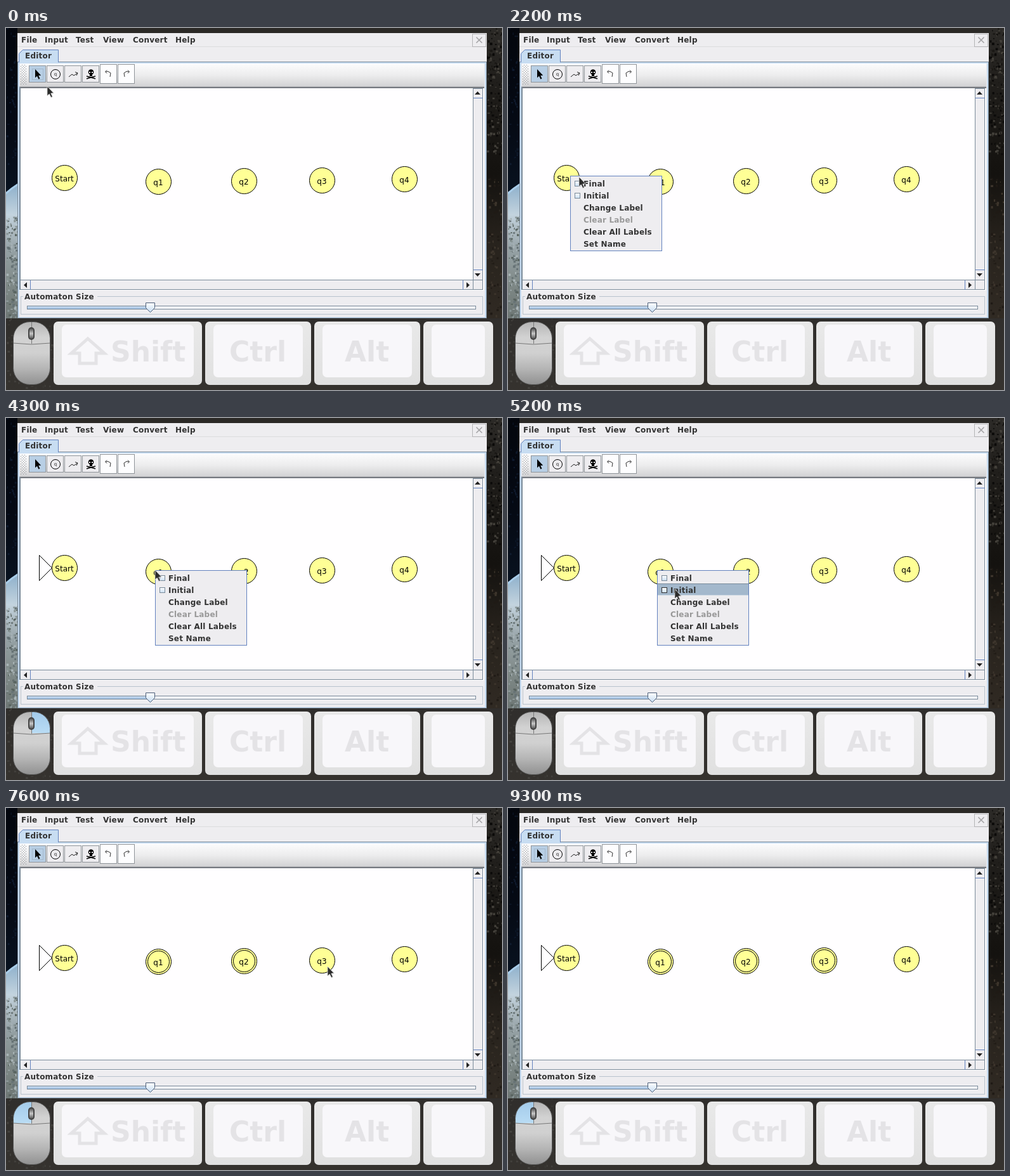
Animation, 782 px wide and 571 px high, one loop 9400 ms. Source, as an HTML page with a canvas:

```html
<!DOCTYPE html>
<html lang="en">
<head>
<meta charset="utf-8">
<title>Automaton editor</title>
<style>
html, body { margin: 0; width: 100%; height: 100%; overflow: hidden; background: #2b2926; }
canvas { display: block; }
</style>
</head>
<body>
<canvas id="stage" width="782" height="571"></canvas>
<script>
const W = 782, H = 571, LOOP = 9400;
const stage = document.getElementById('stage').getContext('2d');
const backdrop = document.createElement('canvas');
backdrop.width = W;
backdrop.height = H;
let c = backdrop.getContext('2d');

const BOLD = 'bold 12px "DejaVu Sans", sans-serif';
const PLAIN = '12px "DejaVu Sans", sans-serif';
const HUGE = 'bold 44px "DejaVu Sans", sans-serif';
const BLUE = '#6382bf', PALE = '#b8cfe5', STEEL = '#7a8a99', PANEL = '#eeedf0';

function fill(x, y, w, h, color) {
  c.fillStyle = color;
  c.fillRect(x, y, w, h);
}
function frame(x, y, w, h, color) {
  c.strokeStyle = color;
  c.lineWidth = 1;
  c.strokeRect(x + .5, y + .5, w - 1, h - 1);
}
function paint(fillColor, lineColor, width = 1) {
  if (fillColor) { c.fillStyle = fillColor; c.fill(); }
  if (lineColor) { c.strokeStyle = lineColor; c.lineWidth = width; c.stroke(); }
}
function round(x, y, w, h, r, ...colors) {
  c.beginPath();
  c.roundRect(x, y, w, h, r);
  paint(...colors);
}
function circle(x, y, r, ...colors) {
  c.beginPath();
  c.arc(x, y, r, 0, 7);
  paint(...colors);
}
function shape(points, ...colors) {
  c.beginPath();
  points.forEach(([x, y]) => c.lineTo(x, y));
  c.closePath();
  paint(...colors);
}
function line(points, color, width) {
  c.beginPath();
  points.forEach(([x, y]) => c.lineTo(x, y));
  paint(null, color, width);
}
function text(s, x, y, color = '#333', font = BOLD, align = 'left') {
  c.font = font;
  c.fillStyle = color;
  c.textAlign = align;
  c.letterSpacing = font === BOLD ? '.2px' : '0px';
  c.fillText(s, x, y);
}
function fade(y0, y1, ...colors) {
  const g = c.createLinearGradient(0, y0, 0, y1);
  colors.forEach((color, i) => g.addColorStop(i / (colors.length - 1), color));
  return g;
}
function arrowhead(x, y, turns) {
  c.save();
  c.translate(x, y);
  c.rotate(turns * 2 * Math.PI);
  shape([[-4.5, 2.5], [0, -2.5], [4.5, 2.5]], '#222');
  c.restore();
}

let seed = 7;
const rnd = () => (seed = seed * 16807 % 2147483647) / 2147483647;
function specks(n, x, y, w, h, ...colors) {
  for (let i = 0; i < n; i++)
    fill(x + rnd() * w, y + rnd() * h, 1 + rnd() * 3, 1 + rnd() * 3, colors[i % colors.length]);
}

function drawWallpaper() {
  fill(0, 0, W, H, '#2b2926');
  fill(0, 0, 18, 300, fade(0, 300, '#03060d', '#050a14', '#0a1524'));
  specks(40, 0, 0, 15, 220, '#0c1626', '#101c30');

  c.save();
  c.beginPath();
  c.rect(0, 230, 18, 228);
  c.clip();
  circle(90, 360, 134, fade(240, 458, '#86abc9', '#c3d3de', '#96a2a6', '#7f8987', '#6d7674'), '#a9cdea', 3);
  specks(170, 0, 295, 18, 163, '#aab5b8', '#667275', '#8a9697', '#58635f');
  c.restore();

  fill(758, 0, 24, 458, fade(0, 458, '#2c2a27', '#1d1b18', '#14120f', '#28231d', '#302a23'));
  specks(200, 758, 0, 24, 200, '#0b0a09', '#43403a', '#1a1815');
  specks(90, 758, 230, 24, 228, '#1f1a15', '#3d352c');
  fill(0, 458, W, 113, fade(458, 571, '#302e2c', '#35322e'));
  specks(120, 0, 458, 74, 113, '#45433f', '#393733');
}

function drawButton(x, y, h, color) {
  fill(x, y, 27, h, color);
  frame(x, y, 27, h, '#8f9499');
}

function drawToolbar() {
  fill(22, 56, 732, 36, fade(56, 92, '#fcfcfd', '#ededee', '#d2d2d4'));
  for (let y = 58; y < 90; y += 2)
    for (let x = 23 + y / 2 % 2 * 2; x < 33; x += 4) fill(x, y, 1, 1, '#8b8f94');
  for (let i = 0; i < 4; i++) drawButton(36 + 28 * i, 59, 27, i ? PANEL : PALE);
  for (const x of [148, 176]) drawButton(x, 57, 31, '#fdfdfe');

  c.save();
  c.translate(46, 65);
  c.scale(.9, .9);
  shape(arrow, '#000');
  c.restore();

  circle(78, 73, 7.5, null, '#000');
  text('q', 78, 75, '#222', '7px "DejaVu Sans", sans-serif', 'center');
  line([[99, 77], [104, 73], [107, 75], [113, 71]], '#222');
  line([[109, 69.5], [113, 71], [111, 75]], '#222');

  circle(134, 69.5, 4.3, '#000');
  fill(132, 72, 4, 4, '#000');
  for (const x of [131, 135]) fill(x, 69, 2, 2, PANEL);
  for (const d of [-7, 7]) line([[134 - d, 76], [134 + d, 80]], '#000', 1.6);

  for (const [x, d] of [[161, 1], [190, -1]]) {
    line([[x - 4 * d, 69], [x, 68.5], [x + 4 * d, 71], [x + 3 * d, 77]], '#333');
    line([[x - 2 * d, 66.5], [x - 4.5 * d, 69], [x - 2 * d, 71.5]], '#333');
  }
}

function drawScrollbars() {
  fill(737, 95, 15, 318, PANEL);
  fill(23, 398, 729, 15, PANEL);
  frame(736, 95, 16, 303, STEEL);
  frame(22, 397, 715, 16, STEEL);
  frame(736, 397, 16, 16, STEEL);
  for (const y of [110, 381]) fill(737, y, 15, 1, BLUE);
  for (const x of [38, 720]) fill(x, 398, 1, 15, BLUE);
  arrowhead(743.5, 102.5, 0);
  arrowhead(743.5, 389.5, .5);
  arrowhead(30.5, 405.5, -.25);
  arrowhead(728.5, 405.5, .25);
}

function drawWindow() {
  fill(18, 8, 740, 450, PANEL);
  [['File', 24], ['Input', 61], ['Test', 110], ['View', 153], ['Convert', 200], ['Help', 267]]
    .forEach(([s, x]) => text(s, x, 23));
  fill(18, 29, 740, 1, '#dcdcde');
  frame(735, 9, 22, 21, '#b4b4b6');
  for (const d of [-4.5, 4.5]) line([[746 - d, 14.5], [746 + d, 23.5]], '#a4a4a6', 1.6);

  fill(18, 53, 740, 405, '#c8ddf2');
  frame(18, 53, 740, 405, STEEL);
  shape([[20.5, 54], [20.5, 40.5], [26.5, 34.5], [82.5, 34.5], [82.5, 54]], '#c8ddf2', BLUE);
  fill(21, 53, 61, 2, '#c8ddf2');
  text('Editor', 30, 48);
  fill(21, 56, 734, 400, PANEL);
  drawToolbar();

  fill(21, 92, 733, 1, '#b5b7ba');
  fill(21, 93, 733, 2, '#75797f');
  fill(21, 93, 2, 320, STEEL);
  fill(752, 95, 2, 319, '#fff');
  fill(23, 95, 713, 302, '#fffeff');
  drawScrollbars();
  fill(21, 413, 733, 1, '#fff');

  frame(23, 423, 729, 29, '#b9c3cd');
  fill(27, 419, 117, 10, PANEL);
  text('Automaton Size', 29, 428);
  fill(33, 438, 708, 6, '#f4f4f8');
  fill(33, 438, 194, 6, fade(438, 444, '#dbe8f5', '#8fb4de'));
  frame(33, 438, 708, 6, STEEL);
  shape([[220.5, 433.5], [234.5, 433.5], [234.5, 441.5], [227.5, 448.5], [220.5, 441.5]],
    fade(433, 448, '#fff', '#c8ddf2'), '#4d5e78');
}

function drawKey(x, w, label, textX) {
  round(x, 463, w, 100, 7, fade(463, 563, '#e9e9e9', '#e0e0e0'));
  round(x + 13, 468, w - 26, 83, 7, '#f8f7fa');
  text(label, textX, 526, '#e4e3e6', HUGE);
}

function drawKeys() {
  drawKey(75, 234, 'Shift', 165);
  drawKey(314, 167, 'Ctrl', 352);
  drawKey(486, 167, 'Alt', 534);
  drawKey(658, 110, '', 0);
  shape([[129, 490], [155, 513], [142, 513], [142, 529], [116, 529], [116, 513], [103, 513]],
    null, '#e4e3e6', 5);
}

function drawMouse(left, right) {
  const body = [11.5, 463.5, 58, 99, 26];
  c.save();
  round(...body, fade(463, 563, '#b4b4b4', '#d2d2d2', '#d0d0d0', '#b4b4b4', '#909090'));
  c.clip();
  const lit = fade(463, 497, '#a3cbea', '#b9dcf4');
  if (left) fill(11, 463, 29, 34, lit);
  if (right) fill(40, 463, 30, 34, lit);
  line([[11, 497], [40, 499], [70, 497]], '#777');
  line([[40.5, 463], [40.5, 498]], '#777');
  c.restore();
  round(...body, null, '#555');
  round(35, 472, 10, 20, 5, '#444');
  round(37, 474, 6, 16, 3, fade(474, 490, '#555', '#c8c8c8', '#555'));
}

const arrow = [[0, 0], [0, 15], [3.3, 12], [6, 17.5], [8.3, 16.5], [5.8, 11], [10.2, 10.7]];
const items = ['Final', 'Initial', 'Change Label', 'Clear Label', 'Clear All Labels', 'Set Name'];
const states = [['Start', 92, 236], ['q1', 240, 242], ['q2', 375, 241], ['q3', 498, 240], ['q4', 628, 238]];

// One menu visit per state: right press, hover, left click on an item.
const visits = [
  { x: 98, y: 233, arrive: 1100, open: 1400, hover: 2050, close: 2700, via: [[0, 65, 92], [700, 108, 182], [800, 108, 182]] },
  { x: 235, y: 240, arrive: 3900, open: 4300, hover: 4400, close: 6000, via: [[3200, 442, 273], [3400, 417, 268], [3500, 417, 268]] },
  { x: 372, y: 240, arrive: 6300, open: 6500, hover: 6600, close: 7200, via: [] },
  { x: 507, y: 250, arrive: 7600, open: 7900, hover: 7900, close: 8400, via: [] }
];

// The pointer drops onto Initial; all visits but the first then step up to Final.
const path = visits.flatMap(({ x, y, arrive, hover, close, via }, i) => {
  const low = [x + 28, y + 30], end = i ? [x + 12, y + 8] : low;
  return [...via, [arrive, x, y], [hover, x, y], [hover + 300, ...low, 4],
    [close - 200, ...low], [close - 100, ...end], [close + 100, ...end]];
});
path.push([8800, ...path.at(-1).slice(1)]);

function pointerAt(t) {
  const i = path.findIndex(p => p[0] > t);
  if (i < 0) return null;
  const [t0, x0, y0] = path[i - 1], [t1, x1, y1, power = 1] = path[i];
  const k = (t - t0) / (t1 - t0);
  return [Math.round(x0 + (x1 - x0) * k), Math.round(y0 + (y1 - y0) * k ** power)];
}

function drawStates(t) {
  if (t >= visits[0].close) shape([[52.5, 216.5], [72.5, 236.5], [52.5, 256.5]], null, '#000');
  states.forEach(([name, x, y], i) => {
    circle(x + .5, y + .5, 20, '#ffff96', '#000');
    if (i && t >= visits[i]?.close) circle(x + .5, y + .5, 17, null, '#000');
    text(name, x, y + 6, '#000', PLAIN, 'center');
  });
}

function drawMenu({ x, y }, [px, py]) {
  fill(x, y, 145, 119, PANEL);
  frame(x, y, 145, 119, BLUE);
  const over = px > x && px < x + 144 ? Math.floor((py - y - 3) / 19) : -1;
  items.forEach((item, i) => {
    const top = y + 3 + i * 19;
    if (i === over) {
      fill(x + 1, top - 1, 143, 19, '#a3b8cc');
      fill(x + 1, top - 1, 143, 1, STEEL);
      fill(x + 1, top + 17, 143, 1, '#c9d6e2');
    }
    if (i < 2) {
      fill(x + 7, top + 5, 9, 9, fade(top + 5, top + 14, '#fff', '#c8ddf2'));
      frame(x + 7, top + 5, 9, 9, i === over ? '#333' : STEEL);
    }
    text(item, x + 21, top + 14, i === 3 ? '#999' : '#333');
  });
}

function drawPointer([x, y]) {
  shape(arrow.map(([dx, dy]) => [x + dx, y + dy]), '#2b2b2b', '#d8d8d8', .8);
}

function draw(now) {
  const t = Math.floor(now % LOOP / 100) * 100;
  const within = (from, to) => t >= from && t < to;
  const pointer = pointerAt(t);
  const menu = visits.find(v => within(v.open, v.close));
  const left = within(500, 1000) || t >= 9300 || visits.some(v => within(v.close - 100, v.close + 500));
  const right = visits.some(v => within(v.arrive + 200, v.arrive + 700));
  c.drawImage(backdrop, 0, 0);
  if (!menu) frame(41, 64, 18, 18, '#a3b8cc');
  drawStates(t);
  drawMouse(left, right);
  if (menu) drawMenu(menu, pointer);
  if (pointer) drawPointer(pointer);
}

drawWallpaper();
drawWindow();
drawKeys();
c = stage;
const start = performance.now();
(function tick() {
  draw(performance.now() - start);
  requestAnimationFrame(tick);
})();
</script>
</body>
</html>
```
